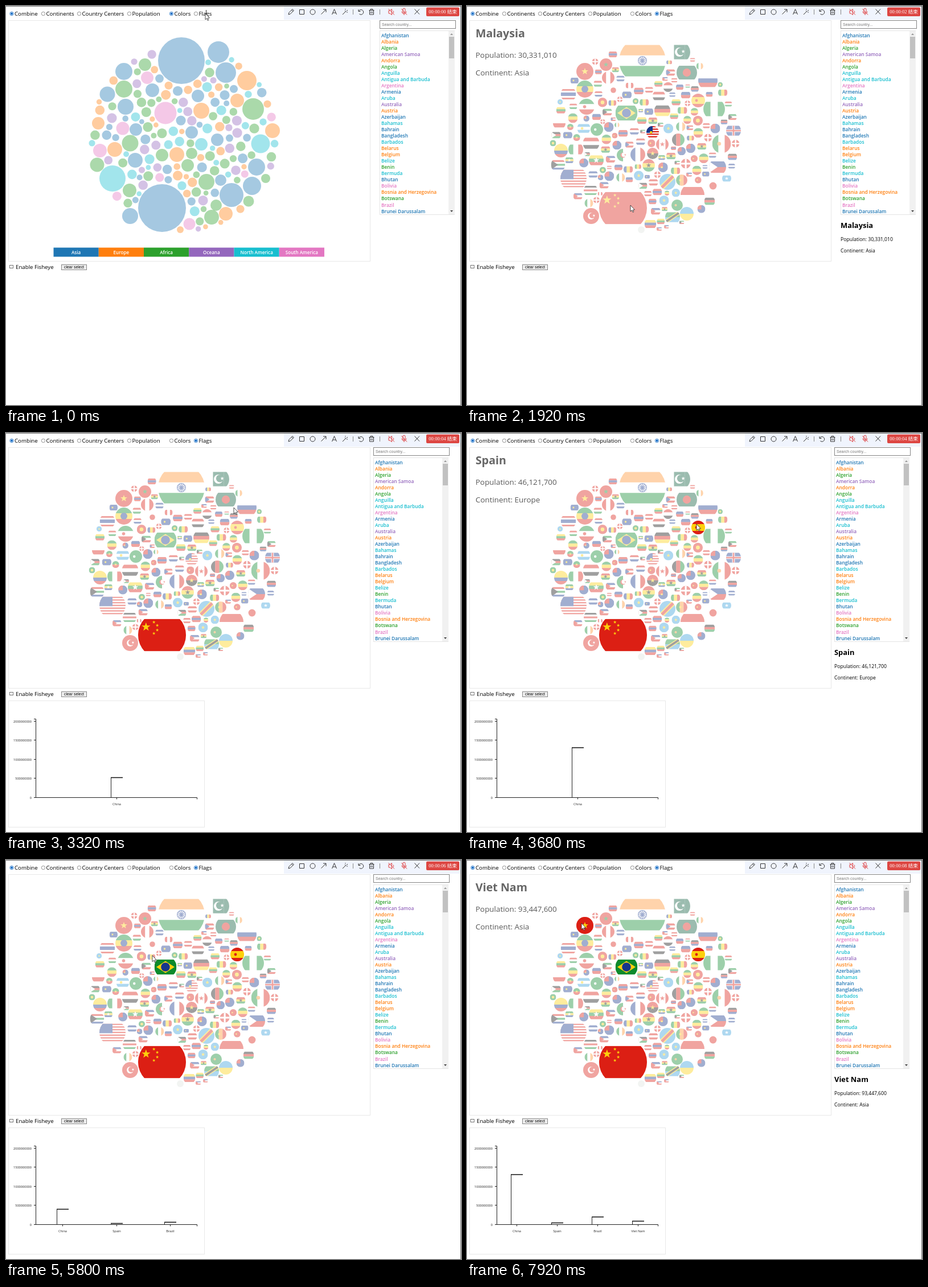
Animation of 799x701 px, one loop 8000 ms. Source, as an HTML page with a canvas:

```html
<!DOCTYPE html>
<html lang="en">
<head>
<meta charset="utf-8">
<title>Country bubbles</title>
<style>
html, body { margin: 0; width: 100%; height: 100%; overflow: hidden; background: #fff; }
canvas { display: block; }
</style>
</head>
<body>
<canvas id="stage" width="799" height="701"></canvas>
<script>
const W = 799, H = 701, LOOP = 8000, TAU = Math.PI * 2, FADED = 0.4;
const SANS = '"Open Sans", "Noto Sans", sans-serif', ARIAL = '"Liberation Sans", Arial, sans-serif';
const ctx = document.getElementById('stage').getContext('2d');

const CONTINENTS = {
  A: ['Asia', '#1f77b4'], E: ['Europe', '#ff7f0e'], F: ['Africa', '#2ca02c'],
  O: ['Oceana', '#9467bd'], N: ['North America', '#17becf'], S: ['South America', '#e377c2']
};
const INK = { r: '#dc1f14', g: '#0c8a2c', n: '#08593a', b: '#16368c', c: '#38a0dc',
  y: '#fdd00c', o: '#ff9430', w: '#ffffff', k: '#111111', s: '#dfe5df' };

const LIST = ('Afghanistan A,Albania E,Algeria F,American Samoa O,Andorra E,Angola F,Anguilla N,' +
  'Antigua and Barbuda N,Argentina S,Armenia A,Aruba N,Australia O,Austria E,Azerbaijan A,Bahamas N,' +
  'Bahrain A,Bangladesh A,Barbados N,Belarus E,Belgium E,Belize N,Benin F,Bermuda N,Bhutan A,' +
  'Bolivia S,Bosnia and Herzegovina E,Botswana F,Brazil S,Brunei Darussalam A').split(',');

const POPULATION = { India: 1311050527, Malaysia: 30331010, China: 1371220000,
  Spain: 46121700, Brazil: 207847530, 'Viet Nam': 93447600 };

// x, y, radius, continent, flag (h/v bands, upper case fills the circle, then symbol + ink pairs), name
const bubbles = [
  [308, 96, 41, 'A', 'howg|nb', 'India'], [274, 355, 42, 'A', 'hr|Cy', 'China'],
  [373, 81, 19, 'A', 'vwnnn|mw'], [386, 117, 18, 'A', 'hn|dr'],
  [207, 115, 15, 'A', 'Hr|sy', 'Viet Nam'], [207, 146, 15, 'F', 'Hgyr|db'],
  [244, 103, 11, 'F', 'Hr|sg'], [248, 126, 11, 'S', 'Vrwr'],
  [178, 155, 13.5, 'A', 'hrwbbwr'], [210, 177, 14, 'A', 'Hgwr|er'],
  [280, 188, 19.5, 'S', 'hg|qydb', 'Brazil'], [343, 184, 14, 'E', 'hkry'],
  [423, 131, 17, 'E', 'hwbr'], [406, 166, 12, 'E', 'Hryyr|er', 'Spain'],
  [434, 181, 19, 'F', 'vgwg'], [468, 219, 13, 'E', 'hb|+w-r'],
  [447, 242, 16.5, 'N', 'Vgwr|eo'], [440, 283, 15, 'A', 'hbr|tw'],
  [432, 316, 16, 'A', 'Hw|dr'], [396, 332, 21, 'A', 'hrw'],
  [386, 365, 12, 'E', 'Hcy'], [361, 371, 13, 'F', 'hgc|zk'],
  [352, 309, 14, 'F', 'Hc|zr'], [322, 383, 10.5, 'S', 'hybr'],
  [218, 369, 14, 'A', 'Hr|mw'], [187, 303, 23, 'N', 'hrwrwrwrwrwrwr|xb'],
  [160, 279, 12.5, 'F', 'hrwgwb|tk'], [165, 254, 12, 'S', 'Hyybr'],
  [191, 252, 13, 'E', 'vgwr'], [218, 241, 14.5, 'F', 'hrwk'],
  [162, 206, 11, 'E', 'hwr'], [227, 271, 13, 'A', 'hygr|sw'],
  [217, 324, 12, 'F', 'hkwrwg'], [300, 261, 13, 'E', 'Vbwr'],
  [274, 262, 11, 'F', 'Vgw|mr'], [205, 215, 11.5, 'S', 'hcwc|ey'],
  [426, 343, 9.5, 'F', 'hkrg'], [371, 235, 11, 'A', 'Vkrg'],
  [326, 259, 10, 'F', 'Hrk|sy'], [319, 280, 11, 'F', 'Hryg|sk'],
  [343, 243, 11, 'N', 'Vrwwr|sr'], [326, 222, 11, 'A', 'Hrwrwrwrwrw|xbey', 'Malaysia'],
  [337, 158, 11, 'A', 'hrwk'], [257, 148, 12, 'A', 'hw|dr'],
  [228, 217, 11, 'A', 'Hg|ew'], [377, 306, 10, 'A', 'Vgor|ey'],
  [369, 350, 10, 'F', 'Hg|eo'], [456, 303, 8, 'F', 'hc|sw'], [306, 393, 6, 'E', 'Hs']
].map(([x, y, r, continent, flag, name]) => ({ x, y, r, continent, flag, name }));

let seed = 20;
const random = () => (seed = (seed * 1664525 + 1013904223) % 4294967296) / 4294967296;
const pick = items => items[Math.floor(random() * items.length)];

// Fill the gaps of the cluster with smaller countries, trying harder as they shrink.
const SMALL_FLAGS = ('hrwr vgyr Hgyr hrwb hbwr|tr Hb|xr Hr|+w Hb|xrey vbyr hgwr|tk hygr hrwg Vgwo Hr|dy ' +
  'hryg|sk Hrwk hbwb Hc|sy hrbr hkrg|tw vrwr hb|ey Hg|dy hgyb|sw hrwr|tb Hr|ey hbr Hgr|sy hkrb').split(' ');
for (let r = 8.6; r > 4.3; r -= 0.3) {
  const tries = 220 + (8.6 - r) * 1500;
  for (let i = 0; i < tries; i++) {
    const a = random() * TAU, d = Math.sqrt(random()) * (167 - r);
    const x = 312 + d * Math.cos(a), y = 232 + d * Math.sin(a);
    if (bubbles.every(b => Math.hypot(b.x - x, b.y - y) > b.r + r + 1)) {
      bubbles.push({ x, y, r, continent: pick('AAAAEEEEEFFFFFFNNNNOOOS'), flag: pick(SMALL_FLAGS) });
    }
  }
}
const byName = name => bubbles.find(b => b.name === name);

function disc(c, x, y, r, color) {
  c.fillStyle = color;
  c.beginPath();
  c.arc(x, y, r, 0, TAU);
  c.fill();
}

function poly(c, points, color) {
  c.fillStyle = color;
  c.beginPath();
  points.forEach(([x, y]) => c.lineTo(x, y));
  c.closePath();
  c.fill();
}

function star(c, x, y, r, color) {
  poly(c, Array.from({ length: 10 }, (_, i) => {
    const a = i * TAU / 10 - TAU / 4, d = i % 2 ? r * 0.4 : r;
    return [x + d * Math.cos(a), y + d * Math.sin(a)];
  }), color);
}

function cross(c, r, h, w, ink) {
  c.fillStyle = ink;
  c.fillRect(-w, -h, w * 2, h * 2);
  c.fillRect(-r, -w, r * 2, w * 2);
}

// Symbols are drawn around the centre; r is half the flag width, h half its height.
const SYMBOLS = {
  d: (c, r, h, ink) => disc(c, 0, 0, r * 0.4, ink),
  e: (c, r, h, ink) => disc(c, -r * 0.25, 0, r * 0.2, ink),
  s: (c, r, h, ink) => star(c, 0, 0, r * 0.42, ink),
  x: (c, r, h, ink) => { c.fillStyle = ink; c.fillRect(-r, -h, r, h * 1.08); },
  t: (c, r, h, ink) => poly(c, [[-r, -h], [0, 0], [-r, h]], ink),
  q: (c, r, h, ink) => poly(c, [[-r * 0.82, 0], [0, -h * 0.8], [r * 0.82, 0], [0, h * 0.8]], ink),
  z: (c, r, h, ink) => {
    poly(c, [[-r, h * 0.55], [r * 0.55, -h], [r, -h], [r, -h * 0.55], [-r * 0.55, h], [-r, h]], INK.y);
    poly(c, [[-r, h * 0.75], [r * 0.75, -h], [r, -h], [r, -h * 0.75], [-r * 0.75, h], [-r, h]], ink);
  },
  '+': (c, r, h, ink) => cross(c, r, h, r * 0.18, ink),
  '-': (c, r, h, ink) => cross(c, r, h, r * 0.1, ink),
  m: (c, r, h, ink, ground) => {
    disc(c, 0, 0, r * 0.42, ink);
    disc(c, r * 0.13, -r * 0.06, r * 0.35, ground);
    star(c, r * 0.35, -r * 0.06, r * 0.18, ink);
  },
  n: (c, r, h, ink) => {
    c.strokeStyle = ink;
    c.lineWidth = 1.2;
    c.beginPath();
    c.arc(0, 0, r * 0.18, 0, TAU);
    for (let i = 0; i < 12; i++) {
      c.moveTo(0, 0);
      c.lineTo(r * 0.17 * Math.cos(i * TAU / 12), r * 0.17 * Math.sin(i * TAU / 12));
    }
    c.stroke();
  },
  C: (c, r, h, ink) => {
    star(c, -r * 0.67, -h * 0.5, r * 0.19, ink);
    [[-0.34, -0.8], [-0.2, -0.6], [-0.2, -0.31], [-0.34, -0.1]].forEach(([x, y]) => star(c, x * r, y * h, r * 0.07, ink));
  }
};

function drawFlag(c, { x, y, r, flag }) {
  const [bands, symbols = ''] = flag.split('|');
  const colors = [...bands.slice(1)], n = colors.length;
  const h = /[HV]/.test(flag[0]) ? r : r * 0.675;
  c.save();
  c.translate(x, y);
  c.beginPath();
  c.arc(0, 0, r, 0, TAU);
  c.clip();
  c.beginPath();
  c.rect(-r, -h, r * 2, h * 2);
  c.clip();
  colors.forEach((key, i) => {
    c.fillStyle = INK[key];
    if (/h/i.test(flag[0])) c.fillRect(-r, -h + 2 * h * i / n, r * 2, 2 * h / n + 0.2);
    else c.fillRect(-r + 2 * r * i / n, -h, 2 * r / n + 0.2, h * 2);
  });
  const ground = INK[colors[n >> 1]];
  for (let i = 0; i < symbols.length; i += 2) SYMBOLS[symbols[i]](c, r, h, INK[symbols[i + 1]], ground);
  c.restore();
}

const flagLayer = document.createElement('canvas');
flagLayer.width = W;
flagLayer.height = H;
bubbles.forEach(b => drawFlag(flagLayer.getContext('2d'), b));

function text(str, x, y, size, color = '#000', { weight = 400, family = SANS, align = 'left' } = {}) {
  ctx.font = `${weight} ${size}px ${family}`;
  ctx.fillStyle = color;
  ctx.textAlign = align;
  ctx.fillText(str, x, y);
}
function rect(x, y, w, h, fill, stroke) {
  if (fill) { ctx.fillStyle = fill; ctx.fillRect(x, y, w, h); }
  if (stroke) { ctx.strokeStyle = stroke; ctx.lineWidth = 1; ctx.strokeRect(x + 0.5, y + 0.5, w - 1, h - 1); }
}
function path(d, color = '#333', width = 1) {
  ctx.strokeStyle = color;
  ctx.lineWidth = width;
  ctx.stroke(new Path2D(d));
}

// Timeline
const CLOCK = [680, 1600, 2480, 3320, 4400, 5400, 6400, 7640];
const HOVERS = [[0, ''], [1100, 'India'], [1320, ''], [1720, 'Malaysia'], [2000, 'China'], [3000, ''],
  [3440, 'Spain'], [4640, ''], [4760, 'Brazil'], [5720, ''], [6160, 'Viet Nam']];
const CLICKS = [[2796, 'China', 1150], [4360, 'Spain', 1150], [5320, 'Brazil', 1150], [6220, 'Viet Nam', 2200]];
const POINTER = [[680, 350, 13], [1880, 287, 350], [2700, 287, 350], [3320, 400, 131], [3640, 403, 160],
  [4440, 403, 160], [4920, 278, 189], [5560, 278, 189], [6260, 201, 111]];

const easeCubic = u => u < 0.5 ? 4 * u ** 3 : 1 - 4 * (1 - u) ** 3;

function pointerAt(t) {
  const i = POINTER.findIndex(p => p[0] > t);
  if (i <= 0) return (i ? POINTER[POINTER.length - 1] : POINTER[0]).slice(1);
  const [t0, x0, y0] = POINTER[i - 1], [t1, x1, y1] = POINTER[i];
  const u = (t - t0) / (t1 - t0), e = u * u * (3 - 2 * u);
  return [x0 + (x1 - x0) * e, y0 + (y1 - y0) * e];
}

function drawControls(flags) {
  const options = [['Combine', 10, true], ['Continents', 65.5], ['Country Centers', 128.5], ['Population', 216.5],
    ['Colors', 290.5, !flags], ['Flags', 333.5, flags]];
  for (const [label, x, on] of options) {
    ctx.strokeStyle = on ? '#0b66c3' : '#777';
    ctx.lineWidth = 0.8;
    ctx.beginPath();
    ctx.arc(x, 13.5, 3.2, 0, TAU);
    ctx.stroke();
    if (on) disc(ctx, x, 13.5, 1.9, '#0b66c3');
    text(label, x + 5, 17, 9.7);
  }
  rect(6, 455, 7, 6, '#fff', '#777');
  text('Enable Fisheye', 17, 461.5, 9.7);
  rect(97, 454, 45, 10, '#efefef', '#888');
  text('clear select', 119.5, 461.3, 6.95, '#000', { family: ARIAL, align: 'center' });
}

function drawRecorder(t) {
  rect(488, 0, 311, 24, '#f0f4fd');
  path('M496 15l1-3.5 6-6 2.4 2.4-6 6zM501.5 7l2.4 2.4M515.5 6.5h8v8h-8zM543 10.5a4.5 4.5 0 1 0-9 0a4.5 4.5 0 1 0 9 0' +
    'M553.5 14.5l8.5-8.5M557 6h5v5M572.5 15l4-9.5 4 9.5M574 12h5M591 15l5.5-5.5M595 8l2.5 2.5M598 9l2-2M596 5v1.5M600 11h-1.5' +
    'M619 6v3.5h3.5M619.5 9a4.3 4.3 0 1 1 1 5M637.5 7.5h9M640 7v-1.5h4v1.5M638.5 7.5v7.5h7v-7.5M640.8 9.5v3.5M643.2 9.5v3.5' +
    'M717.5 5.5l8.5 9M726 5.5l-8.5 9');
  path('M609.5 6v9M656.5 6v9', '#888');
  path('M672 8h2l3.5-2.5v10l-3.5-2.5h-2zM680 8.5q1.5 2 0 4M671.5 5l10.5 10.5' +
    'M697 6a2 2 0 0 1 4 0v4a2 2 0 0 1-4 0zM695 9.5a4 4 0 0 0 8 0M699 13.5v2.5M694.5 5l9.5 10.5', '#df3e3e');
  ctx.fillStyle = '#dd4642';
  ctx.beginPath();
  ctx.roundRect(738, 2.5, 58, 15.5, 2);
  ctx.fill();
  const seconds = CLOCK.filter(tick => t >= tick).length;
  text(`00:00:0${seconds} 结束`, 767, 13, 8.5, '#fff',
    { family: '"Liberation Serif", "Noto Sans CJK SC", serif', align: 'center' });
}

function drawSidebar(x, hover) {
  rect(x, 25, 134, 15, '#fff', '#858585');
  text('Search country...', x + 4, 35, 7, '#777', { family: ARIAL });
  rect(x, 43, 132, 324, '#fff', '#e4e4e4');
  LIST.forEach((entry, i) => {
    text(entry.slice(0, -2), x + 3, 54.7 + i * 11.03, 8.4, CONTINENTS[entry.slice(-1)][1], { weight: 600 });
  });
  rect(x + 121, 44, 11, 322, '#f1f1f1');
  rect(x + 122, 54, 9, 38, '#c1c1c1');
  poly(ctx, [[x + 124, 51], [x + 129, 51], [x + 126.5, 48]], '#999');
  poly(ctx, [[x + 124, 359], [x + 129, 359], [x + 126.5, 362]], '#444');
  if (hover) drawDetails(hover, x, [390, 413, 433], 12.9, 8.63, '#000', '#000');
}

function drawDetails(name, x, lines, titleSize, size, titleColor, color) {
  text(name, x, lines[0], titleSize, titleColor, { weight: 700 });
  text('Population: ' + POPULATION[name].toLocaleString('en-US'), x, lines[1], size, color);
  text('Continent: ' + CONTINENTS[byName(name).continent][0], x, lines[2], size, color);
}

function drawBubbles(flags, lit) {
  ctx.globalAlpha = FADED;
  if (flags) ctx.drawImage(flagLayer, 0, 0);
  else bubbles.forEach(b => disc(ctx, b.x, b.y, b.r, CONTINENTS[b.continent][1]));
  ctx.globalAlpha = 1;
  lit.forEach(name => drawFlag(ctx, byName(name)));
  if (flags) return;
  Object.values(CONTINENTS).forEach(([name, color], i) => {
    const w = 79.25, x = 83.5 + i * w;
    rect(x, 424.5, w, 16, color);
    text(name, x + w / 2, 436, 8.1, '#fff', { weight: 600, align: 'center' });
  });
}

function drawChart(t, clicks) {
  const [start, , duration] = clicks[clicks.length - 1];
  const grow = easeCubic(Math.max(0, Math.min(1, (t - start) / duration)));
  const base = 640.5, step = 33.6, band = 283 / clicks.length;
  rect(4, 470, 345, 223, '#fff', '#e8e8e8');
  path(`M49 502.5h3.5V${base}M49 ${base}H335.5v3`, '#222');
  for (let i = 0; i < 5; i++) {
    const y = Math.floor(base - i * step) + 0.5;
    path(`M49 ${y}h3.5`, '#222');
    text(String(i * 5e8), 45, y + 2, 5.6, '#222', { align: 'right' });
  }
  clicks.forEach(([, name], i) => {
    const x = Math.floor(52.5 + band * (i + 0.5)), y = base - grow * POPULATION[name] / 5e8 * step;
    path(`M${x + 0.5} ${base}v3M${x - 9.5} ${base}V${y}`, '#222');
    path(`M${x - 10} ${Math.min(y, 638.5)}h21`, '#111', 1.5);
    text(name, x + 0.5, 654, 5.6, '#222', { align: 'center' });
  });
}

function drawPointer(t) {
  if (t < 680) path('M351.5 7v12', '#222');
  if (t >= 6400 && t < 6720) path('M6.5 451v14', '#222');
  const [x, y] = pointerAt(t);
  ctx.save();
  ctx.translate(x, y);
  poly(ctx, [[0, 0], [0, 11], [2.5, 8.7], [4.2, 12.4], [5.8, 11.7], [4.2, 8.2], [7.5, 8]], '#fff');
  ctx.strokeStyle = '#222';
  ctx.lineWidth = 0.8;
  ctx.stroke();
  ctx.restore();
}

function draw(t) {
  const flags = t >= 680;
  const hover = HOVERS.filter(h => t >= h[0]).pop()[1];
  const clicks = CLICKS.filter(c => t >= c[0]);
  const lit = new Set(clicks.map(c => c[1]));
  if (hover) lit.add(hover);

  rect(0, 0, W, H, '#fff');
  rect(4, 25, 636, 424, null, '#e8e8e8');
  drawBubbles(flags, lit);
  if (hover) drawDetails(hover, 15, [54.5, 91, 122], 19.6, 13.4, '#666', '#595959');
  drawControls(flags);
  drawSidebar(clicks.length ? 645 : 656, hover);
  if (clicks.length) drawChart(t, clicks);
  drawRecorder(t);
  rect(0, 0, W, 1, '#777');
  rect(798, 0, 1, H, '#777');
  drawPointer(t);
}

const began = performance.now();
function frame() {
  draw((performance.now() - began) % LOOP);
  requestAnimationFrame(frame);
}
frame();
</script>
</body>
</html>
```
